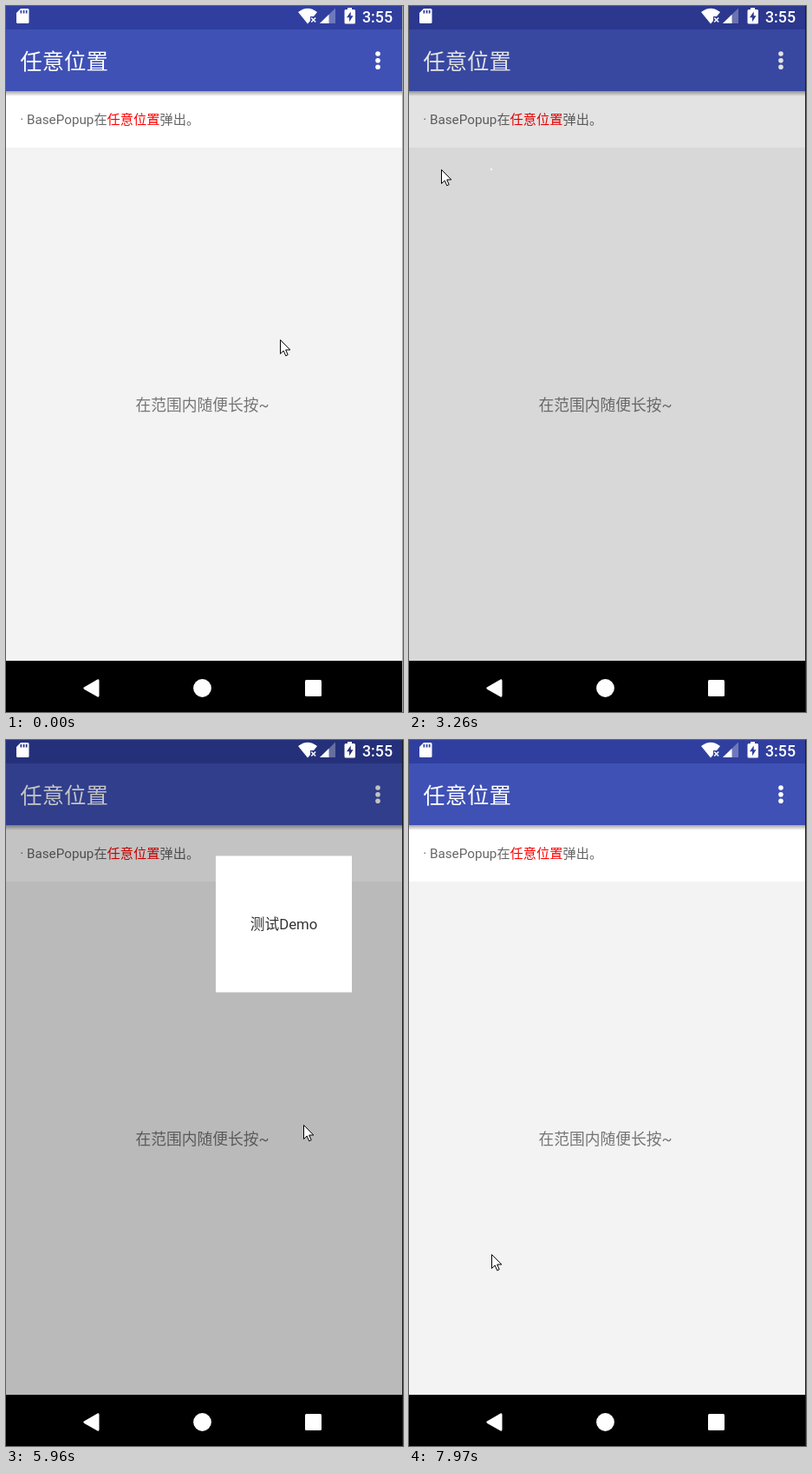
An HTML page with a canvas for the animation above (8000 ms loop, 458x813 px).

```html
<!DOCTYPE html>
<html lang="zh-CN">
<meta charset="utf-8">
<style>
html, body { margin: 0; width: 100%; height: 100%; overflow: hidden; background: #000; }
canvas { display: block; }
</style>
<canvas id="stage" width="458" height="813"></canvas>
<script>
const c = document.getElementById('stage').getContext('2d');
const LOOP = 8000, OPEN = 380, CLOSE = 310, DIM = 0.56, SIZE = 190.6;
const FONT = "Roboto, 'Noto Sans CJK SC', 'Noto Sans CJK', sans-serif";

// open time, close time, centre
const popups = [
  [1130, 1956, 210.5, 462],
  [3222, 3900, 95, 188],
  [5001, 5831, 320.5, 212],
  [6875, 7650, 338, 658.5]
];

// start, end, destination of each pointer move
const moves = [
  [0, 0, 316, 384],
  [50, 590, 211, 462],
  [1480, 1870, 189, 662],
  [2080, 2610, 37, 188],
  [3360, 3640, 230, 240],
  [4050, 4430, 321, 212],
  [5400, 5820, 343, 443],
  [5990, 6340, 338, 669],
  [7030, 7420, 95, 592]
];

const clamp = v => Math.max(0, Math.min(1, v));

function rect(x, y, w, h, color) {
  c.fillStyle = color;
  c.fillRect(x, y, w, h);
}

function shape(d, color) {
  c.fillStyle = color;
  c.fill(new Path2D(d));
}

function disc(x, y, r) {
  c.beginPath();
  c.arc(x, y, r, 0, Math.PI * 2);
  c.fillStyle = '#fff';
  c.fill();
}

function text(str, x, y, size, color, weight = 400) {
  c.font = `${weight} ${size}px ${FONT}`;
  c.fillStyle = color;
  c.fillText(str, x, y);
  return x + c.measureText(str).width;
}

function drawPage() {
  rect(0, 0, 458, 27, '#303f9f');
  rect(0, 27, 458, 71, '#3f51b5');
  rect(0, 98, 458, 65, '#fff');
  rect(0, 163, 458, 591, '#f3f3f3');
  const shadow = c.createLinearGradient(0, 98, 0, 104);
  shadow.addColorStop(0, 'rgba(0,0,0,.35)');
  shadow.addColorStop(1, 'rgba(0,0,0,0)');
  rect(0, 98, 458, 6, shadow);

  text('任意位置', 16.3, 72.5, 25.4, '#fff');
  for (const y of [55, 62.7, 70.3]) disc(429, y, 2.8);

  let x = text('· BasePopup在', 16.2, 136, 15.24, '#666');
  x = text('任意位置', x, 136, 15.24, '#f00');
  text('弹出。', x, 136, 15.24, '#666');

  c.textAlign = 'center';
  text('在范围内随便长按~', 226.5, 465.5, 17.78, '#757575');
  c.textAlign = 'left';
}

function drawBars(bar) {
  // memory card
  shape('M17 3H25Q26.5 3 26.5 4.5V18.5Q26.5 20 25 20H13.5Q12 20 12 18.5V8Z', '#fff');
  for (const x of [16.5, 19.7, 22.8]) rect(x, 5, 1.7, 3.5, bar);
  // wireless
  shape('M337 7Q348 -1.500 359 7L355 12H351V17L348 20.500Z', '#fff');
  c.strokeStyle = '#fff';
  c.lineWidth = 1.5;
  c.stroke(new Path2D('M352.200 13.500L357.200 18.500M357.200 13.500L352.200 18.500'));
  // signal
  shape('M380 2.500V20H362Z', 'rgba(255,255,255,.3)');
  shape('M372.500 9.800V20H362Z', '#fff');
  // battery
  shape('M394 4V2H399V4H401.500Q403 4 403 5.500V19Q403 20.500 401.500 20.500H392Q390.500 20.500 390.500 19V5.500Q390.500 4 392 4Z', '#fff');
  shape('M397.700 6.500L393 13.300H396V18.300L400.500 11.300H397.700Z', bar);
  text('3:55', 411, 18.5, 17.78, '#fff', 500);

  rect(0, 754, 458, 59, '#000');
  shape('M90 784.500L105.500 775.500Q107.500 774.700 107.500 777V794Q107.500 796.300 105.500 795.500L90 786.700Q88.500 785.600 90 784.500Z', '#fff');
  disc(226.5, 785.5, 10.4);
  shape('M346.500 776H362.500Q364 776 364 777.500V793.500Q364 795 362.500 795H346.500Q345 795 345 793.500V777.500Q345 776 346.500 776Z', '#fff');
}

function popupState(t) {
  const p = popups.find(([a, b]) => t >= a && t < b + CLOSE);
  if (!p) return { dim: 0, scale: 0 };
  const [start, end, x, y] = p;
  if (t < end) {
    const k = clamp((t - start) / OPEN);
    return { x, y, scale: k * k, dim: DIM * (1 - (1 - k) ** 2) };
  }
  const k = clamp((t - end) / CLOSE);
  return { x, y, scale: 1 - k * k, dim: DIM * (1 - k) ** 1.6 };
}

function drawPopup({ x, y, scale }) {
  if (scale < 0.003) return;
  c.save();
  c.translate(x, y);
  c.scale(scale, scale);
  rect(-SIZE / 2, -SIZE / 2, SIZE, SIZE, '#fff');
  c.textAlign = 'center';
  text('测试Demo', 0, 7.5, 20.32, '#333');
  c.restore();
}

function drawPointer(t) {
  let [, , x, y] = moves[0];
  for (const [start, end, nx, ny] of moves.slice(1)) {
    const k = clamp((t - start) / (end - start));
    const e = k * k * (3 - 2 * k);
    x += (nx - x) * e;
    y += (ny - y) * e;
  }
  c.save();
  c.translate(Math.round(x) + 0.5, Math.round(y) + 0.5);
  const arrow = new Path2D('M0 0V16L3.700 12.500L6.200 18.300L8.700 17.200L6.200 11.500H11.300Z');
  c.fillStyle = '#fff';
  c.fill(arrow);
  c.strokeStyle = '#000';
  c.lineWidth = 1;
  c.stroke(arrow);
  c.restore();
}

function draw(now) {
  const t = now % LOOP;
  const popup = popupState(t);
  drawPage();
  rect(0, 0, 458, 754, `rgba(0,0,0,${popup.dim})`);
  const lit = 1 - popup.dim;
  drawBars(`rgb(${48 * lit},${63 * lit},${159 * lit})`);
  drawPopup(popup);
  rect(457, 0, 1, 813, t < 60 ? '#aaa' : '#1c1c1c');
  drawPointer(t);
  requestAnimationFrame(() => draw(performance.now()));
}
draw(performance.now());
</script>
</html>
```
